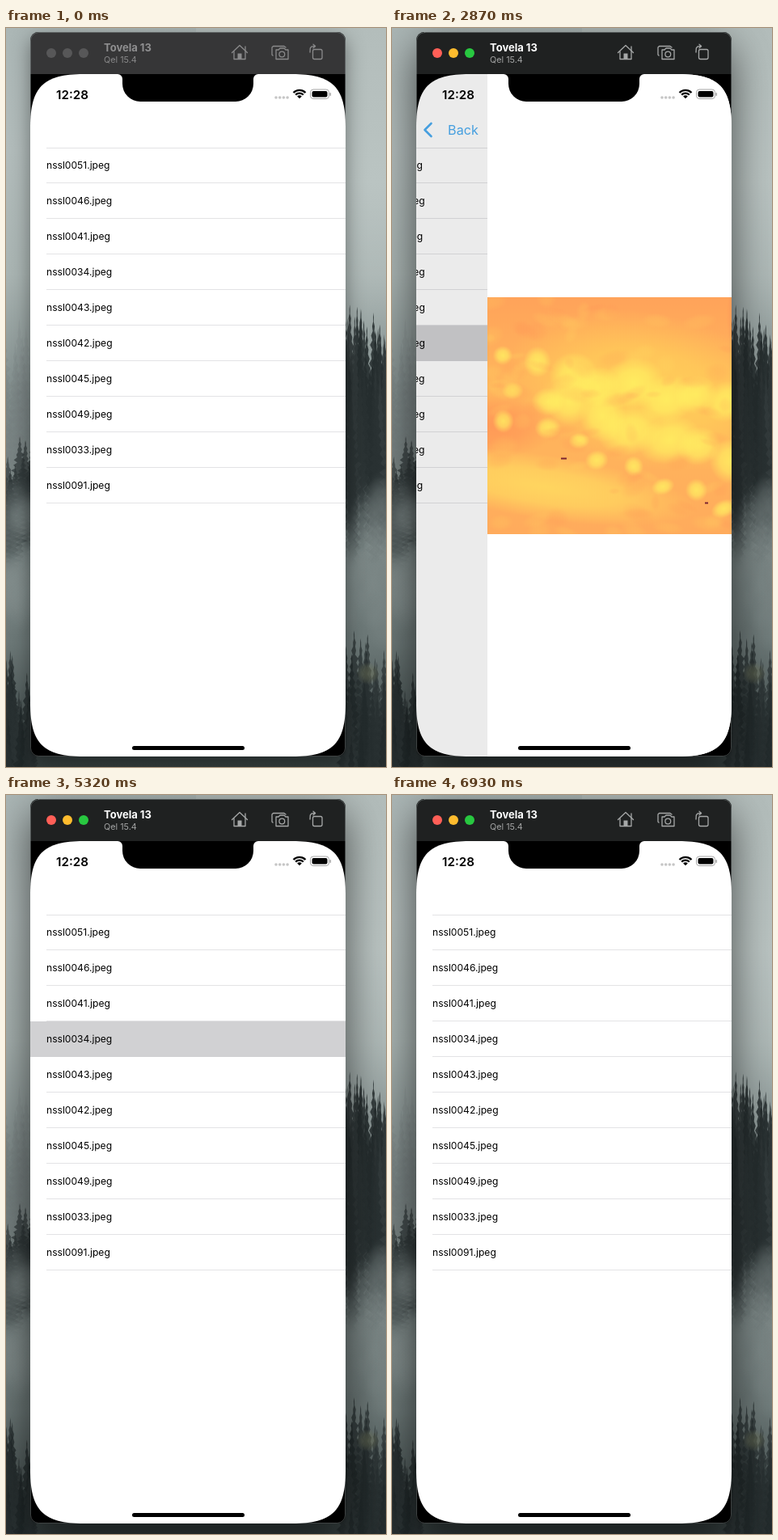
These frames come from a looping animation (470x914 px, 7630 ms). An HTML page with a canvas:

```html
<!DOCTYPE html>
<html lang="en">
<head>
<meta charset="utf-8">
<title>Photo list</title>
<style>
html, body { margin: 0; width: 100%; height: 100%; overflow: hidden; background: #a9b4b3; }
canvas { display: block; width: 470px; height: 914px; }
</style>
</head>
<body>
<canvas id="stage" width="470" height="914"></canvas>
<script>
const W = 470, H = 914, LOOP = 7630, STEP = 70;
const X = 30, TOP = 57, SW = 390, SH = 844;   // phone screen
const PH = 293, PY = TOP + (SH - PH) / 2;     // photo, centred
const SANS = 'Inter, "Open Sans", sans-serif';
const ctx = document.getElementById('stage').getContext('2d');

const files = ['51', '46', '41', '34', '43', '42', '45', '49', '33', '91'].map(n => `nssl00${n}.jpeg`);

function seeded(seed) {
  return () => {
    seed = (seed * 16807) % 2147483647;
    return seed / 2147483647;
  };
}

function layer(w, h, seed, draw) {
  const c = document.createElement('canvas');
  c.width = w;
  c.height = h;
  const rnd = seeded(seed);
  draw(c.getContext('2d'), (a, b) => a + (b - a) * rnd());
  return c;
}

// vertical gradient with evenly spaced colours
function fade(g, y0, y1, ...colors) {
  const r = g.createLinearGradient(0, y0, 0, y1);
  colors.forEach((c, i) => r.addColorStop(i / (colors.length - 1), c));
  return r;
}

function rect(g, x, y, w, h, fill) {
  g.fillStyle = fill;
  g.fillRect(x, y, w, h);
}

function box(g, x, y, w, h, r, fill, stroke) {
  g.beginPath();
  g.roundRect(x, y, w, h, r);
  if (fill) { g.fillStyle = fill; g.fill(); }
  if (stroke) { g.strokeStyle = stroke; g.stroke(); }
}

function dot(g, x, y, r, fill) {
  g.beginPath();
  g.arc(x, y, r, 0, 7);
  g.fillStyle = fill;
  g.fill();
}

// soft ellipse; rgb is "r,g,b"
function glow(g, x, y, rx, ry, rgb, a = 1, turn = 0) {
  g.save();
  g.translate(x, y);
  g.rotate(turn);
  g.scale(rx, ry);
  const r = g.createRadialGradient(0, 0, 0, 0, 0, 1);
  r.addColorStop(0, `rgba(${rgb},${a})`);
  r.addColorStop(0.5, `rgba(${rgb},${a * 0.75})`);
  r.addColorStop(1, `rgba(${rgb},0)`);
  rect(g, -1, -1, 2, 2, r);
  g.restore();
}

function line(g, ...pts) {
  g.beginPath();
  pts.forEach(([x, y]) => g.lineTo(x, y));
  g.stroke();
}

function text(s, x, y, font, fill) {
  ctx.font = `${font} ${SANS}`;
  ctx.fillStyle = fill;
  ctx.fillText(s, x, y);
}

// ---- wallpaper ----
// spruces whose feet dissolve into the mist
function grove(g, rand, count, x0, x1, y0, y1, h, w, tone, alpha) {
  for (let i = 0; i < count; i++) {
    const x = rand(x0, x1), y = y0 + (y1 - y0) * i / count, k = tone + rand(0, 16);
    const rgb = `${k},${k + 8},${k + 9}`;
    g.fillStyle = fade(g, y, y + h, `rgba(${rgb},${alpha})`, `rgba(${rgb},${alpha})`, `rgba(${rgb},0)`);
    g.beginPath();
    g.moveTo(x, y);
    for (const side of [1, -1]) {
      for (let j = 0; j <= 40; j++) {
        const d = side > 0 ? j : 40 - j;
        const half = w * Math.min(1, d / 18) * (d % 2 ? rand(0.7, 1.2) : rand(0.3, 0.6));
        g.lineTo(x + side * half, y + h * d / 40);
      }
    }
    g.fill();
  }
}

const wallpaper = layer(W, H, 41, (g, rand) => {
  rect(g, 0, 0, W, H, fade(g, 0, H, '#abb6b5', '#b2bcbb', '#a9b4b2', '#7f8b8a', '#768281', '#6b7776', '#353f3f'));
  rect(g, 235, 0, 235, 380, fade(g, 0, 380, '#b3bdbb', '#bac4c2', 'rgba(180,190,188,0)'));
  grove(g, rand, 8, -4, 30, 350, 430, 220, 13, 105, 0.18);
  grove(g, rand, 9, -4, 32, 505, 550, 130, 13, 40, 0.65);
  grove(g, rand, 40, 416, 476, 342, 440, 230, 9, 36, 0.9);
  for (let i = 0; i < 26; i++) {
    glow(g, i % 2 ? rand(0, 30) : rand(420, 470), rand(590, 740), 22, rand(25, 50), '132,143,142', 0.28);
  }
  grove(g, rand, 22, -4, 34, 770, 890, 200, 11, 28, 0.75);
  grove(g, rand, 30, 414, 474, 745, 890, 200, 11, 30, 0.75);
  glow(g, 448, 798, 15, 14, '110,115,88', 0.5);
});

// ---- photos ----
const stormPhoto = layer(SW, PH, 9, (g, rand) => {
  rect(g, 0, 0, SW, PH, fade(g, 130, PH, '#f8e8be', '#f6dab0', '#e8b59c'));
  glow(g, 155, 185, 80, 45, '255,240,190', 0.8);
  glow(g, 0, 235, 60, 45, '196,180,168', 0.5);

  const rim = x => Math.max(135, 188 - 0.0024 * (x - 55) ** 2) + 5 * Math.sin(x / 9) + 3 * Math.sin(x / 3.7);
  g.fillStyle = '#07050a';
  g.beginPath();
  g.moveTo(0, 0);
  for (let x = 0; x <= SW; x += 2) g.lineTo(x, rim(x) - 6);
  g.lineTo(SW, 0);
  g.fill();

  // bright gap, crossed by a dark arm
  g.save();
  g.beginPath();
  g.ellipse(8, 134, 53, 38, 0, 0, 7);
  g.clip();
  rect(g, 0, 96, 65, 80, fade(g, 96, 176, '#3f5067', '#c3ccca', '#eee3c4', '#f1dfb8', '#e8d4b0'));
  g.restore();
  for (let i = 0; i < 16; i++) glow(g, 64 - 4 * i, 130 + 3.4 * i, 15, 11, '16,16,22', 0.8, -0.7);

  const tones = ['16,16,22', '40,46,58', '104,110,118'];
  for (let i = 0; i < 240; i++) {
    const x = rand(0, SW);
    glow(g, x, rim(x) + rand(-16, 14), rand(3, 9), rand(2, 7), tones[i % 3], 0.65, rand(0, 3));
  }
  dot(g, 46, 253, 1, '#43302d');
});

const pouchPhoto = layer(SW, PH, 23, (g, rand) => {
  rect(g, 0, 0, SW, PH, fade(g, 0, PH, '#ffa35a', '#ffb45c', '#ffb35c', '#ffab5c'));
  glow(g, 380, 25, 85, 95, '255,84,74', 0.9);
  glow(g, 390, 225, 75, 65, '255,80,66', 0.85);
  glow(g, 5, 160, 80, 40, '255,144,86', 0.7);
  glow(g, 200, 115, 180, 95, '255,212,88', 0.8, 0.2);
  glow(g, 70, 235, 190, 40, '255,220,96', 0.85, 0.15);

  // three slanting rows of cloud pouches, largest in the middle
  for (let row = 0; row < 3; row++) {
    for (let i = 0; i < 10; i++) {
      const u = i / 9, size = row < 2 ? 13 + 22 * Math.sin(Math.PI * u) : 14;
      glow(g, 28 + 345 * u + rand(-9, 9), 82 + 32 * row + (70 + 40 * row) * u + rand(-10, 10),
        size * rand(0.8, 1.2), size * rand(0.7, 1.1), '255,246,98', 0.75, -0.5 * u);
    }
  }
  for (let i = 0; i < 130; i++) {
    glow(g, rand(0, SW), rand(0, PH), rand(6, 24), rand(4, 14),
      i % 2 ? '255,140,84' : '255,226,98', 0.16, rand(-0.5, 0.5));
  }
  rect(g, 91, 199, 7, 2, '#7c2430');
  rect(g, 269, 254, 4, 2, '#7c2430');
  dot(g, 332, 52, 1, '#a03a3a');
});

const dishPhoto = layer(SW, PH, 77, (g, rand) => {
  const dark = '#2d0c17';
  rect(g, 0, 0, SW, PH, fade(g, 0, PH, '#ffda80', '#ffe389', '#ffe88f', '#fff8bd', '#ffe48a'));
  glow(g, 325, 5, 85, 40, '255,150,90', 0.85, 0.15);
  for (let i = 0; i < 60; i++) {
    const y = rand(0, 240);
    glow(g, rand(0, SW), y, rand(25, 75), rand(4, 12),
      i % 2 ? '255,248,180' : '255,212,112', 0.4, 0.35 - y / 600);
  }
  glow(g, 270, 225, 170, 26, '255,251,210', 0.8, -0.05);
  glow(g, 350, PH + 2, 200, 15, '216,58,44', 1, -0.03);
  for (let i = 0; i < 5; i++) dot(g, 154 + (i % 2) * 8, 62 + i * 3.5, 0.8, '#7a4630');

  // railing
  g.strokeStyle = dark;
  g.lineWidth = 1.3;
  for (const d of [0, 11, 24]) line(g, [0, 266 + d], [8, 260 + d], [115, 261 + d], [169, 268 + d]);
  for (const x of [8, 38, 57, 115, 137, 168]) line(g, [x, 260 + Math.max(0, x - 115) / 8], [x, PH]);

  // antenna
  g.fillStyle = dark;
  for (const [x, y, w, h] of [[62, 183, 30, 37], [74, 218, 15, 26], [69, 240, 24, 28], [73, 266, 18, 27], [86, 183, 35, 4]]) {
    g.fillRect(x, y, w, h);
  }
  g.beginPath();
  g.ellipse(45, 190, 14, 41, -0.05, 0, 7);
  g.fill();
  dot(g, 111, 185, 6, dark);
  dot(g, 92, 224, 6, dark);
  g.strokeRect(26, 185, 5, 6);
  for (let i = 0; i < 5; i++) dot(g, 49 + i * 9, 187 + i * 12, 1.2, '#f4b66c');
});

// ---- window ----
function toolIcons(color) {
  ctx.strokeStyle = color;
  ctx.lineWidth = 1.3;
  ctx.lineJoin = ctx.lineCap = 'round';
  // home
  line(ctx, [279.5, 30.5], [289, 21.5], [298.5, 30.5]);
  line(ctx, [282, 29], [282, 38.5], [296, 38.5], [296, 23]);
  rect(ctx, 286.5, 31.5, 5, 7, color);
  // screenshot
  line(ctx, [330, 34], [329, 33], [329, 24], [330.5, 22.5], [344, 22.5], [346, 24]);
  line(ctx, [334, 38.5], [334, 27], [337, 27], [339, 25], [344, 25], [346, 27], [349, 27], [349, 38.5], [334, 38.5]);
  ctx.beginPath();
  ctx.arc(341.3, 32.5, 3.4, 0, 7);
  ctx.stroke();
  // rotate
  box(ctx, 379.5, 26.5, 11.5, 12, 2, null, color);
  line(ctx, [376, 30], [376.3, 25], [378, 22.8], [382.5, 22.5]);
  line(ctx, [380, 20.3], [382.5, 22.5], [380, 24.8]);
}

function windowFrame(active) {
  ctx.save();
  ctx.shadowColor = active ? 'rgba(0,0,0,.62)' : 'rgba(0,0,0,.42)';
  ctx.shadowBlur = active ? 52 : 24;
  ctx.shadowOffsetY = active ? 18 : 8;
  box(ctx, X, 5, SW, 896, 10, '#000');
  ctx.restore();
  box(ctx, X, 5, SW, TOP - 5, [10, 10, 0, 0], active ? '#1f2121' : '#363637');
  ctx.lineWidth = 1;
  box(ctx, X + 0.5, 5.5, SW - 1, 895, 10, null, 'rgba(140,148,148,.45)');
  ['#ff5f57', '#febc2e', '#28c840'].forEach((c, i) => dot(ctx, 56 + 20 * i, 31, 6, active ? c : '#575758'));
  text('Tovela 13', 121, 29, '700 13px', active ? '#fff' : '#8f8f90');
  text('Qel 15.4', 121, 43, '400 10.8px', active ? '#a3a4a4' : '#888889');
  toolIcons(active ? '#a6a8a8' : '#8a8a8b');
}

// continuous-curvature corners
function screenPath() {
  const e = 66, c = 16, l = X, r = X + SW, t = TOP, b = TOP + SH;
  ctx.beginPath();
  ctx.moveTo(l, t + e);
  ctx.bezierCurveTo(l, t + c, l + c, t, l + e, t);
  ctx.lineTo(r - e, t);
  ctx.bezierCurveTo(r - c, t, r, t + c, r, t + e);
  ctx.lineTo(r, b - e);
  ctx.bezierCurveTo(r, b - c, r - c, b, r - e, b);
  ctx.lineTo(l + e, b);
  ctx.bezierCurveTo(l + c, b, l, b - c, l, b - e);
}

function statusBar() {
  ctx.fillStyle = '#000';
  ctx.beginPath();
  ctx.moveTo(138, TOP);
  ctx.arcTo(144, TOP, 144, 63, 6);
  ctx.arcTo(144, 91, 166, 91, 22);
  ctx.arcTo(306, 91, 306, 69, 22);
  ctx.arcTo(306, TOP, 312, TOP, 6);
  ctx.fill();
  text('12:28', 62, 87.5, '600 15.2px', '#000');
  for (let i = 0; i < 4; i++) dot(ctx, 334 + 4.7 * i, 86, 1.8, '#c6c6c6');

  ctx.strokeStyle = '#000';
  ctx.lineCap = 'butt';
  for (const [r, w] of [[10.4, 2.3], [6.7, 2.3], [2, 4]]) {
    ctx.lineWidth = w;
    ctx.beginPath();
    ctx.arc(363, 87.3, r, -Math.PI * 0.755, -Math.PI * 0.245);
    ctx.stroke();
  }
  ctx.lineWidth = 1;
  box(ctx, 376.5, 76, 23, 11.5, 3.6, null, '#a5a5a5');
  box(ctx, 378.5, 78, 19, 7.5, 2, '#000');
  box(ctx, 400.5, 80, 1.5, 4, 1, '#a5a5a5');
  box(ctx, 156, 888, 139, 5, 2.5, '#000');
}

// ---- screens ----
function list(row, cover, mark) {
  const x = X + 20 - 0.3 * SW * cover;
  rect(ctx, X, TOP, SW, SH, '#fff');
  rect(ctx, x, 148, SW, 1, '#e3e3e5');
  files.forEach((name, i) => {
    const y = 148 + 44 * i;
    rect(ctx, x, y + 43, SW, 1, '#e3e3e5');
    if (i === row) rect(ctx, X, y, SW, 44, `rgba(209,209,211,${mark})`);
    text(name, x, y + 26.3, '400 12.1px', '#000');
  });
  rect(ctx, X, TOP, SW, SH, `rgba(0,0,0,${0.1 * cover})`);
}

function detail(photo, shift) {
  rect(ctx, X + shift, TOP, SW, SH, '#fff');
  ctx.drawImage(photo, X + shift, PY);
}

function backButton(shift, color, alpha) {
  ctx.save();
  ctx.globalAlpha = alpha;
  ctx.strokeStyle = color;
  ctx.lineWidth = 2.6;
  ctx.lineCap = ctx.lineJoin = 'round';
  line(ctx, [48.5, 118], [40.5, 126], [48.5, 134]);
  text('Back', 59 + shift * 0.115, 132, '400 16.2px', color);
  ctx.restore();
}

// ---- timeline ----
const visits = [
  { row: 0, photo: stormPhoto, tap: 420, open: 440, press: 1750, close: 1785 },
  { row: 5, photo: pouchPhoto, tap: 2730, open: 2713, press: 3990, close: 4110 },
  { row: 3, photo: dishPhoto, tap: 5320, open: 5365, press: 6230, close: 6334 }
];

// critically damped spring, 0 to 1
function spring(ms) {
  const x = Math.max(0, ms) * 0.018;
  return 1 - (1 + x) * Math.exp(-x);
}

function render(t) {
  ctx.drawImage(wallpaper, 0, 0);
  windowFrame(t >= 420);
  ctx.save();
  screenPath();
  ctx.clip();
  const v = visits.find(s => t >= s.tap && t < s.close + 505);
  if (v) {
    const out = spring(t - v.close);
    const shift = Math.round(SW * (1 - spring(t - v.open) + out));
    const cover = 1 - shift / SW;
    list(v.row, cover, 1 - out);
    detail(v.photo, shift);
    if (t < v.press) backButton(shift, '#469fdf', Math.min(1, Math.max(0, (cover - 0.3) / 0.4)));
    else backButton(shift, '#67a4ba', 0.27 * (1 - out * out));
  } else {
    list(-1, 0, 0);
  }
  statusBar();
  ctx.restore();
}

const start = performance.now();
let last = -1;
function tick() {
  const t = Math.floor(((performance.now() - start) % LOOP) / STEP) * STEP;
  if (t !== last) render(last = t);
  requestAnimationFrame(tick);
}
tick();
</script>
</body>
</html>
```
